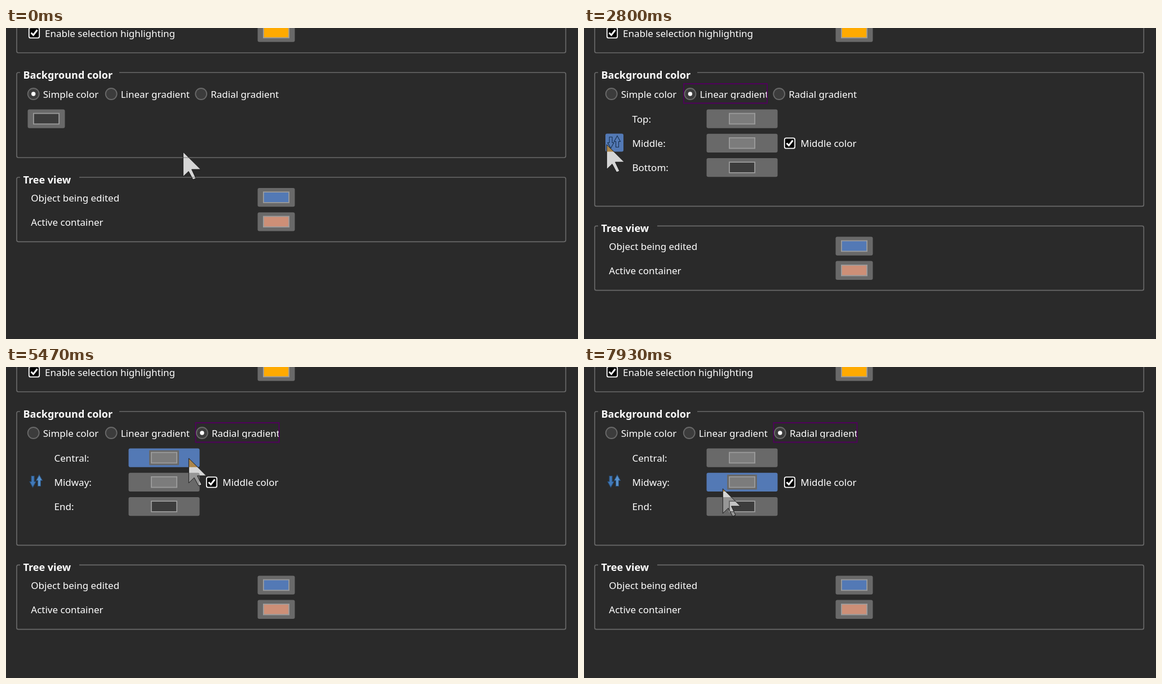
An HTML page with a canvas that plays this animation: 1015 by 552 pixels, repeating every 8000 ms.

```html
<!DOCTYPE html>
<html lang="en">
<head>
<meta charset="utf-8">
<title>Background color settings</title>
<style>
  html, body { margin: 0; width: 100%; height: 100%; overflow: hidden; background: #2a2a2a; }
  canvas { display: block; }
</style>
</head>
<body>
<canvas id="stage" width="1015" height="552"></canvas>
<script>
const ctx = document.getElementById('stage').getContext('2d');
const LOOP = 8000, STEPS_PER_SECOND = 15;
const BG = '#2a2a2a', GREY = '#696969', BLUE = '#5379b5', LIGHT = '#7c7c7c', DARK = '#3c3c3c';
const ROW = 43.2, EXPANSION = 2 * ROW;

const within = (value, from, to) => value >= from && value < to;
const inside = ([px, py], x, y, w, h) => within(px, x, x + w) && within(py, y, y + h);
const smooth = u => u * u * (3 - 2 * u);

// The pointer rests wherever the latest glide left it.
function pointerAt(step) {
  let x = 314, y = 220;
  const glide = (from, to, toX, toY) => {
    const u = smooth(Math.min(1, Math.max(0, (step - from) / (to - from))));
    x += (toX - x) * u;
    y += (toY - y) * u;
  };
  glide(0, 7, 196, 101);      // linear option
  glide(11, 16, 206, 177);
  glide(17, 25, 319, 189);    // middle color
  glide(28, 33, 371, 172);
  glide(33, 42, 40, 207);     // swap
  glide(56, 62, 279, 128);
  glide(62, 70, 382, 128);    // radial option
  glide(78, 82, 324, 162);
  glide(82, 91, 67, 236);
  glide(91, 95, 46, 209);     // swap
  glide(106, 119, 246, 216);  // midway color
  return [Math.round(x), Math.round(y)];
}

function text(str, x, y, bold) {
  ctx.font = `${bold ? 'bold 18px' : '17px'} "Noto Sans", sans-serif`;
  ctx.fillStyle = '#fff';
  ctx.fillText(str, x, y);
}

function paint(fill, stroke, width) {
  if (fill) {
    ctx.fillStyle = fill;
    ctx.fill();
  }
  if (stroke) {
    ctx.strokeStyle = stroke;
    ctx.lineWidth = width;
    ctx.stroke();
  }
}

function box(x, y, w, h, r, fill, stroke, width) {
  ctx.beginPath();
  ctx.roundRect(x, y, w, h, r);
  paint(fill, stroke, width);
}

function circle(x, y, r, fill, stroke, width) {
  ctx.beginPath();
  ctx.arc(x, y, r, 0, 2 * Math.PI);
  paint(fill, stroke, width);
}

function polygon(points) {
  ctx.beginPath();
  points.forEach(([x, y]) => ctx.lineTo(x, y));
  ctx.closePath();
}

function group(title, y, bottom, gapEnd) {
  box(19, y + 1, 974.3, bottom - y - 1, 3, null, GREY, 1.7);
  if (!title) return;
  ctx.fillStyle = BG;
  ctx.fillRect(25, y - 2, gapEnd - 25, 6);
  text(title, 30.5, y + 11.5, true);
}

function colorButton(x, y, w, color, hover) {
  box(x, y, w, 33.3, 3, hover ? BLUE : GREY);
  const left = x + (w - 47) / 2, top = y + 6.3;
  if (hover) box(left - 3, top - 3, 53, 26.5, 1, GREY);
  box(left + 0.9, top + 0.9, 45.2, 18.7, 0, color, '#9c9c9c', 1.8);
}

function checkbox(cx, cy) {
  box(cx - 9.2, cy - 9.2, 18.4, 18.4, 3, '#000', '#fff', 1.8);
  ctx.beginPath();
  ctx.moveTo(cx - 5.5, cy);
  ctx.lineTo(cx - 1.5, cy + 4);
  ctx.lineTo(cx + 5.5, cy - 5);
  paint(null, '#fff', 3);
}

function radio(label, left, width, selected, focused, pointer) {
  const hover = inside(pointer, left, 98, width, 36);
  const x = left + (focused ? 1.7 : 0);
  if (focused) box(left + 1, 99, width - 2, 34.5, 0, null, '#50005c', 1.8);
  circle(x + 10.7, 117, 10, hover ? BLUE : DARK, hover ? BLUE : GREY, 1.8);
  if (selected) circle(x + 10.7, 117, 3.7, '#fff');
  ctx.save();
  if (focused) {
    ctx.beginPath();
    ctx.rect(left, 99, width - 1.5, 27.5);
    ctx.clip();
  }
  text(label, x + 27.7, 123.5);
  ctx.restore();
}

function swapArrow(cx, tipY, dir, fill, outline) {
  const half = [[0, 0], [5.5, 10], [2.5, 10], [2.5, 20]];
  const mirrored = half.map(([x, y]) => [-x, y]).reverse();
  polygon([...half, ...mirrored].map(([x, y]) => [cx + x, tipY + dir * y]));
  paint(fill, outline, 1.1);
}

function swapButton(pointer, pressed) {
  const hover = inside(pointer, 38, 187, 32, 33);
  const outline = hover ? '#17304f' : '#28507c';
  if (hover) box(38, 187.5, 32, 32, 3, pressed ? '#3f6299' : BLUE);
  swapArrow(47.5, 213.5, -1, hover ? BLUE : '#4179b8', outline);
  swapArrow(59, 191.5, 1, hover ? BLUE : '#5890ca', outline);
}

function gradientRows(labels, colors, pointer) {
  labels.forEach((label, i) => {
    const y = 144.5 + i * ROW;
    text(label, 85.5, y + 23.5);
    colorButton(217.5, y, 126, colors[i], inside(pointer, 217, y, 127, 34));
  });
  checkbox(365, 204.5);
  text('Middle color', 384.3, 211);
}

// White blended by difference inverts whatever lies below the pointer.
function drawPointer([x, y]) {
  ctx.save();
  ctx.translate(x, y);
  polygon([[0.3, 0], [0.3, 43.8], [10, 34.5], [17.8, 49], [23, 47], [15.5, 31], [31.5, 31]]);
  ctx.globalCompositeOperation = 'difference';
  paint('#fff');
  ctx.globalCompositeOperation = 'source-over';
  paint(null, '#111', 0.9);
  ctx.restore();
}

function draw(time) {
  const step = Math.floor((time % LOOP + 4) * STEPS_PER_SECOND / 1000);
  const mode = step < 11 ? 'Simple' : step < 74 ? 'Linear' : 'Radial';
  const pointer = pointerAt(step);
  const swapped = within(step, 48, 56) || within(step, 98, 106);
  const pressed = [48, 56, 98, 106].includes(step);
  const grow = mode === 'Simple' ? 0 : EXPANSION;

  ctx.fillStyle = BG;
  ctx.fillRect(0, 0, 1015, 552);

  group('', -40, 44);
  checkbox(50, 8.5);
  text('Enable selection highlighting', 69, 15.5);
  colorButton(446.5, -8.5, 66, '#ffaa00');

  group('Background color', 78, 230 + grow, 201);
  radio('Simple color', 38, 127, mode === 'Simple', false, pointer);
  radio('Linear gradient', 176, 150, mode === 'Linear', mode === 'Linear', pointer);
  radio('Radial gradient', 335.5, 150, mode === 'Radial', mode === 'Radial', pointer);
  if (mode === 'Simple') {
    colorButton(38.5, 144.5, 66, DARK);
  } else {
    const labels = mode === 'Radial' ? ['Central:', 'Midway:', 'End:'] : ['Top:', 'Middle:', 'Bottom:'];
    gradientRows(labels, swapped ? [DARK, LIGHT, LIGHT] : [LIGHT, LIGHT, DARK], pointer);
    swapButton(pointer, pressed);
  }

  group('Tree view', 264 + grow, 379.3 + grow, 130);
  [['Object being edited', BLUE], ['Active container', '#cd8f77']].forEach(([label, color], i) => {
    const y = 284 + grow + i * ROW;
    text(label, 44.3, y + 23.7);
    colorButton(446.5, y, 66, color);
  });

  drawPointer(pointer);
}

const start = performance.now();
function tick() {
  draw(performance.now() - start);
  requestAnimationFrame(tick);
}
tick();
</script>
</body>
</html>
```
